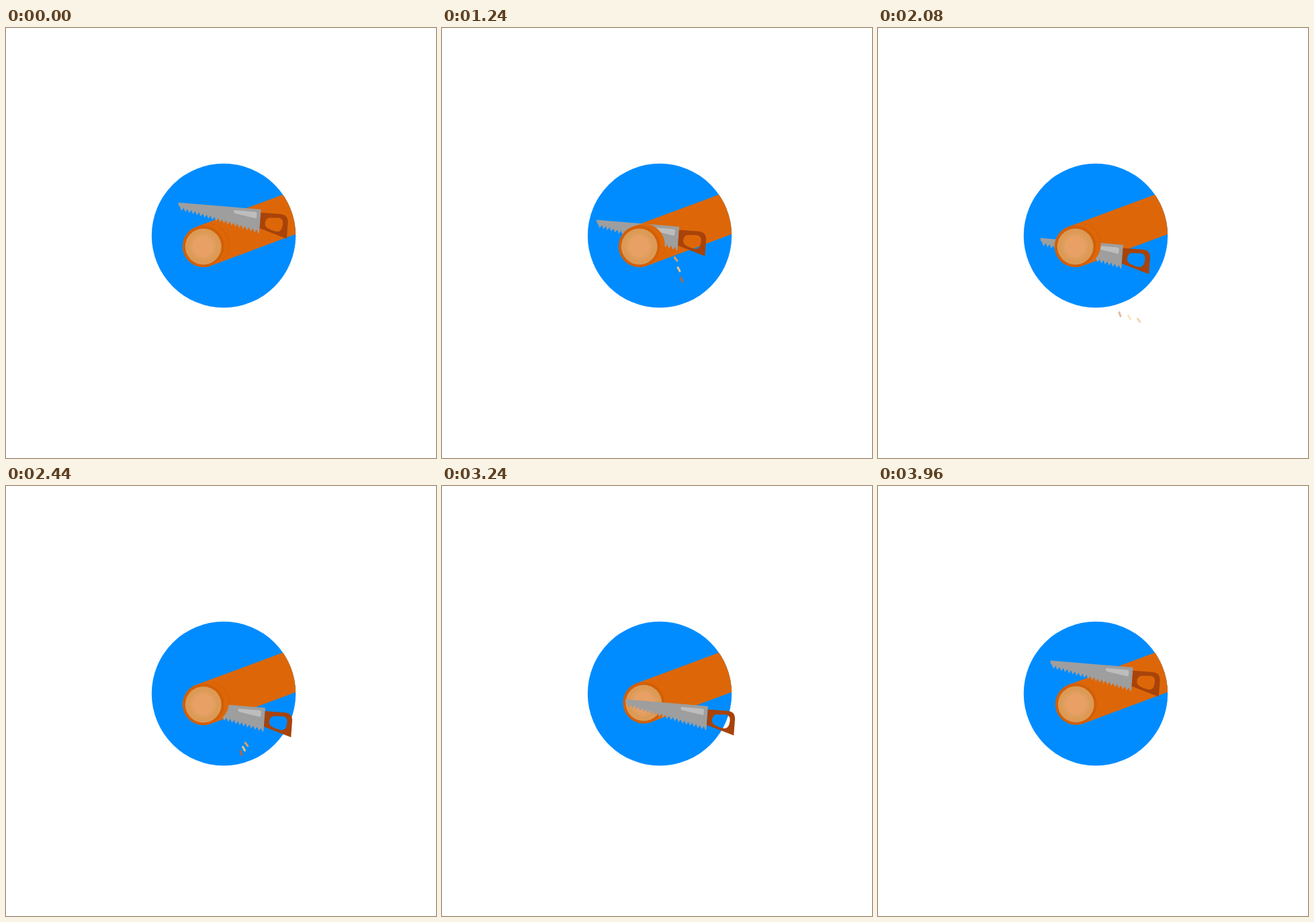
An HTML page that plays this animation: 640x640 px, repeating every 4000 ms.

```html
<!DOCTYPE html>
<html lang="en">
<head>
<meta charset="utf-8">
<title>Sawing a log</title>
<style>
  html, body { margin: 0; width: 100%; height: 100%; overflow: hidden; background: #fff; }
  svg { display: block; width: 100%; height: 100%; }
</style>
</head>
<body>
<svg viewBox="0 0 640 640">
  <defs>
    <clipPath id="disc"><circle cx="324" cy="309" r="107.2"/></clipPath>
    <g id="face">
      <circle cx="293.8" cy="325" r="30.9" fill="#d25f07"/>
      <circle cx="293.7" cy="325.3" r="26.9" fill="#dc9a55"/>
      <circle cx="293.5" cy="325" r="20" fill="#e09e5e"/>
      <circle cx="293.5" cy="325" r="16" fill="#e8a064"/>
    </g>
  </defs>
  <circle cx="324" cy="309" r="107.2" fill="#008cff"/>
  <g clip-path="url(#disc)">
    <g id="log">
      <path d="M293.8 325 L463.8 261.8" stroke="#dd6708" stroke-width="61.8"/>
      <use href="#face"/>
    </g>
  </g>
  <g id="chips" stroke-width="3" stroke-linecap="round"></g>
  <g id="saw">
    <path id="blade" fill="#9e9e9e"/>
    <path d="M340 271 L371.5 273.8 Q373.5 274 373.4 276 L373 281.5 Q372.8 283.5 371 283.2 L341 276 Q339 275.4 339 273 Q339 271 340 271Z" fill="#bdbdbd"/>
    <path fill="#a8430a" fill-rule="evenodd" d="M379.3 274.8 L409 277 Q419.8 278 419.6 289 L417.8 313.7 L377.5 298Z
      M392 282.4 Q387 283 385.7 289 Q384.5 295 389.5 298 Q395 301.5 403 303 Q409 303.5 411 297 Q412.6 292 412 287.5 Q410.5 283 405 282.6Z"/>
  </g>
  <g id="slice">
    <path d="M293.8 325 L300.8 322.4" stroke="#dd6708" stroke-width="61.8" stroke-linecap="round"/>
    <use href="#face"/>
  </g>
</svg>
<script>
const LOOP = 4000, STEP = 40;
const byId = id => document.getElementById(id);
const [log, saw, slice, chips] = ['log', 'saw', 'slice', 'chips'].map(byId);
const progress = (t, from, to) => Math.min(1, Math.max(0, (t - from) / (to - from)));
const smooth = p => p * p * (3 - 2 * p);
const ease = (t, from, to) => smooth(progress(t, from, to));
const move = (el, x, y) => el.setAttribute('transform', `translate(${x.toFixed(2)} ${y.toFixed(2)})`);

// Sawing pace: strokes completed by each time, slowing as the cut deepens
const PACE = [[300, 0], [1720, 2.446], [2440, 3.449], [2800, 4], [3200, 4.386]];

function strokeCount(t) {
  let count = 0;
  for (let i = 1; i < PACE.length; i++) {
    const [t0, n0] = PACE[i - 1], [t1, n1] = PACE[i];
    count += (n1 - n0) * progress(t, t0, t1);
  }
  return count;
}

const cutDepth = t => 60.5 * ease(t, 0, 2620);
const sawTravel = t => ease(t, 480, 640) * (33 * Math.sin(2 * Math.PI * strokeCount(t)) - 4);

function bladePath() {
  const teeth = 20;
  let d = 'M256.5 259.8 L379.6 270 L377 304';
  for (let i = teeth; i >= 0; i--) {
    const x = 261 + 114.5 * i / teeth;
    const y = 272 + 34 * i / teeth;
    d += `L${x} ${y}L${x - 2.2} ${y - 6}`;
  }
  return d + 'L256.8 264Z';
}
byId('blade').setAttribute('d', bladePath());

const chipLines = ['#dba257', '#efc77b', '#b8663a'].map(color => {
  const line = document.createElementNS('http://www.w3.org/2000/svg', 'path');
  line.setAttribute('d', 'M-3 0H3');
  line.setAttribute('stroke', color);
  return chips.appendChild(line);
});

// Chips leave the cut spread out and bunch up while they fall
function drawChips(t) {
  const start = 600, period = 530, bursts = 4;
  const burst = (t - start) / period;
  const visible = burst >= 0 && burst < bursts;
  const fall = smooth(((burst % 1) + 1) % 1);
  const originX = 352 - 0.4 * cutDepth(t);
  chipLines.forEach((line, i) => {
    const x = originX + 65 * fall + 7 * i * (1 - 3.4 * fall);
    const y = 331 + 117 * fall + 18 * i * (1 - 1.4 * fall);
    line.setAttribute('transform', `translate(${x} ${y}) rotate(${52 + 9 * i})`);
    line.setAttribute('opacity', visible ? 1 - progress(fall, 0.8, 0.96) : 0);
  });
}

function draw(t) {
  const travel = sawTravel(t);
  const away = 1 - ease(t, 3200, 3450);
  move(saw, travel * away, (cutDepth(t) + 0.08 * travel) * away);

  const shift = 8 - 7.3 * progress(t, 3040, LOOP);
  move(log, shift, -0.372 * shift);

  const fall = progress(t, 2740, 3200);
  move(slice, -12 * fall, 150 * fall * fall);
  slice.setAttribute('opacity', 1 - progress(t, 3040, 3200));

  drawChips(t);
}

const start = performance.now();
function tick(now) {
  const t = Math.max(0, now - start) % LOOP;
  draw(Math.floor(t / STEP) * STEP);
  requestAnimationFrame(tick);
}
draw(0);
requestAnimationFrame(tick);
</script>
</body>
</html>
```
